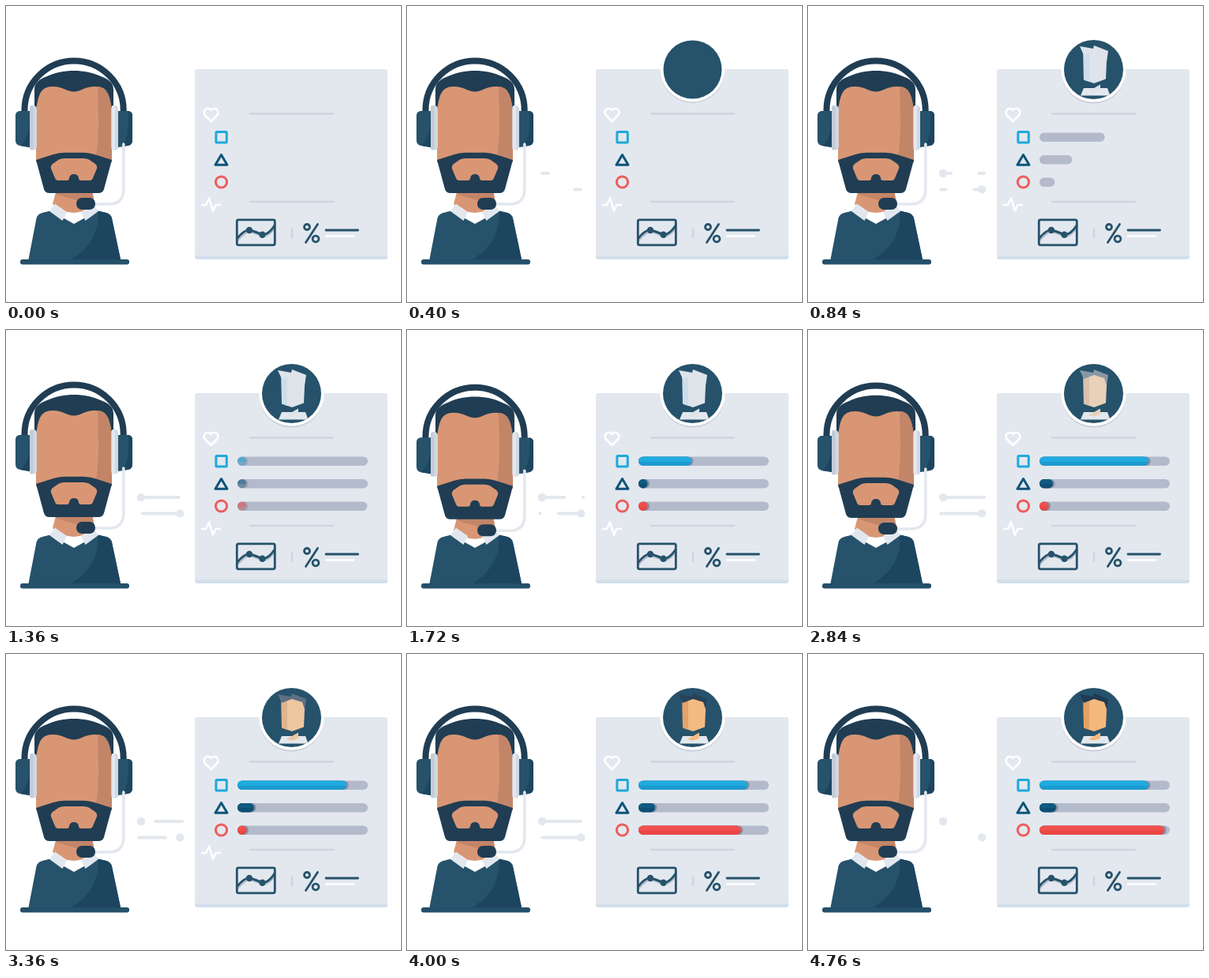
Animation, 500 px wide and 375 px high, one loop 4800 ms. Source, as an HTML page:

```html
<!DOCTYPE html>
<html lang="en">
<head>
<meta charset="utf-8">
<title>Support agent and customer profile</title>
<style>
  html, body { margin: 0; width: 100%; height: 100%; overflow: hidden; background: #fff; }
  svg { display: block; width: 100%; height: 100%; }
  .line { fill: none; stroke-linecap: round; stroke-linejoin: round; }
</style>
</head>
<body>
<svg viewBox="0 0 500 375">
  <defs>
    <clipPath id="disc"><circle cx="361.5" cy="80.5" r="37.5"/></clipPath>
    <clipPath id="cup"><path d="M142 133H155Q160 134 160 139V170Q160 176 154 177L142 179Z"/></clipPath>
  </defs>

  <!-- agent -->
  <path d="M60 252H112L101 268L86 275L71 268Z" fill="#fff"/>
  <g id="head">
    <path d="M64 232L59 251Q72 262 86 262Q102 261 112 251L109 232Z" fill="#d99674"/>
    <path d="M64 234H109L112 250Q84 246 63 238Z" fill="#c38568"/>
    <path d="M36 132V106C36 97 42 93 52 89C72 79.500 100 79.500 120 89C130 93 136 97 136 106V132L134 150H38Z" fill="#203d53"/>
    <path d="M38 198V140C38 128 40 118 43 111Q47 102 59 102C72 102 77 108.500 86 108.500S99 102 113 102Q125 102 129 111C132 118 134 128 134 140V198Z" fill="#d99674"/>
    <path d="M116 102.200Q125 102 129 111C132 118 134 128 134 140V198L114 190Q117 170 117 145Z" fill="#c38568"/>
    <path d="M38 195L60 188Q66 186 74 185.800H98Q106 186 112 188L134 195L124 232Q122.500 237 117 237H55Q49.500 237 48 232Z" fill="#203d53"/>
    <path d="M74 193H98Q102 193 105 194.500L113 200Q116 203 115 206L110 218Q109 221 106 221H95Q92 221 92 218Q91 213 86 213T80 218Q80 221 77 221H66Q63 221 62 218L57 206Q56 203 59 200L67 194.500Q70 193 74 193Z" fill="#d99674"/>
  </g>
  <path d="M28.500 321L38.500 269Q40 263.500 46 262L56 259.500L86 276L116 259.500L127 262Q132.500 263.500 134 269L145 321Z" fill="#26526b"/>
  <path d="M116.500 259.500C118 285 108 306 83 321H145L134 269Q132.500 263.500 127 262Z" fill="#1d4560"/>
  <path d="M71 262L86 275L101 262L86 266Z" fill="#fff"/>
  <path d="M62 250.500L55 260L71.500 272L77 261ZM110 250.500L117 260L100.500 272L95 261Z" fill="#e2e7ef"/>
  <rect x="18" y="321" width="138" height="6.500" rx="3" fill="#25506a"/>
  <g id="headset">
    <path class="line" d="M23.500 135V132A62.600 62.600 0 0 1 148.700 132V135" stroke="#203d53" stroke-width="8"/>
    <path d="M30 133H17Q12 134 12 139V170Q12 176 18 177L30 179Z" fill="#26526b"/>
    <path d="M30 133V179L18 177Q26 172 29 155Z" fill="#1d4560"/>
    <g clip-path="url(#cup)">
      <path d="M142 130H161V182H142Z" fill="#26526b"/>
      <path d="M155 130H161V182H142Q155 172 155 150Z" fill="#1d4560"/>
    </g>
    <rect x="30" y="126" width="9" height="56.500" rx="4.500" fill="#d0d8e2"/>
    <rect x="30" y="126" width="4.500" height="56.500" rx="2.200" fill="#c2ccd8"/>
    <rect x="133.500" y="126" width="8.500" height="56.500" rx="4.200" fill="#d0d8e2"/>
    <rect x="133.500" y="126" width="4.500" height="56.500" rx="2.200" fill="#e2e7ef"/>
    <path class="line" d="M148.800 175V232Q148.800 251 130 251H112" stroke="#e3e7ee" stroke-width="3.500"/>
    <rect x="89" y="243" width="24" height="15" rx="7.200" fill="#203d53"/>
  </g>

  <!-- connection -->
  <g class="line" stroke="#e3e7ee" stroke-width="4">
    <g id="link">
      <path id="grown"/><path id="leaving"/>
      <circle id="dot" cx="171" cy="212" fill="#e3e7ee" stroke="none"/>
    </g>
    <use href="#link" transform="rotate(180 195.600 222.200)"/>
  </g>

  <!-- card -->
  <rect x="239" y="80" width="244" height="241" rx="3.500" fill="#d2dfeb"/>
  <path d="M239 316.500V83.500Q239 80 242.500 80H479.500Q483 80 483 83.500V316.500Z" fill="#e3e8ef"/>
  <g class="line" stroke-width="3">
    <path d="M309 136.500H414M309 248H414M362 283V293" stroke="#cfd4e0" stroke-width="2.600"/>
    <path d="M259.500 146L251.500 138A5 5 0 0 1 259.500 132A5 5 0 0 1 267.500 138Z" stroke="#fff" stroke-width="2.600"/>
    <path id="pulse" d="M248 252H253L257 243.500L262 259.500L265.500 252H271" stroke="#fff" stroke-width="2.600"/>
    <rect x="265.900" y="159.600" width="13.400" height="13.400" rx="1" stroke="#1fa9db"/>
    <path d="M272.500 188.600L280 201.300H265Z" stroke="#0f5479"/>
    <circle cx="272.500" cy="223" r="7.100" stroke="#ee5d5a"/>
    <g stroke="#26526b" stroke-width="2.800">
      <path d="M293 297Q303 285 309 286T326 292Q334 290 340 281" stroke="#b3bacb"/>
      <rect x="292.300" y="270.800" width="48" height="32" rx="2"/>
      <path d="M293 294Q302 283 308 284T325 290Q333 289 340 278"/>
      <g fill="#26526b" stroke="none"><circle cx="308" cy="284" r="4.200"/><circle cx="324.500" cy="289.800" r="4.200"/></g>
      <circle cx="381" cy="280" r="3.500"/><circle cx="392" cy="295" r="3.900"/>
      <path d="M394.500 276.500L379.500 299.500M405 284H445.500"/>
    </g>
    <path d="M405 291.500H440" stroke="#fff" stroke-width="2.500"/>
  </g>
  <g id="bars"></g>

  <!-- portrait -->
  <g id="portrait">
    <circle cx="361.500" cy="82.500" r="41" fill="#c8ced8"/>
    <circle cx="361.500" cy="80.500" r="41.300" fill="#fff"/>
    <circle cx="361.500" cy="80.500" r="37.500" fill="#26526b"/>
    <g id="person" clip-path="url(#disc)">
      <path d="M345 113.500L349 104H379L382.500 113.500Z" fill="#e3e7ee"/>
      <path class="skin" d="M355 108L370 99.500V107L362 109.500Z"/>
      <path class="skin" d="M348.500 58L363 54L378.500 60L377 92.500L362 98L349 93.500Z"/>
      <path class="shade" d="M348.500 58L356 56V96L349 93.500Z"/>
      <path class="hair" d="M344 51L361 54L362 50L380 57L378 70L375 61L362 57L349 62Z"/>
    </g>
  </g>
</svg>
<script>
const LOOP = 4800;
const $ = id => document.getElementById(id);
const ramp = (t, start, length) => Math.min(1, Math.max(0, (t - start) / length));
const ease = (t, start, length) => (1 - Math.cos(Math.PI * ramp(t, start, length))) / 2;
const mix = (a, b, k) => `rgb(${a.map((v, i) => v + (b[i] - v) * k)})`;

const BAR_H = 11.5;
const bars = [
  { y: 160.5, width: 138, color: '#1fabdf', dark: '#1c9bd0', grow: 536 },
  { y: 189, width: 21, color: '#0f5a80', dark: '#0d4f74', grow: 655 },
  { y: 217.5, width: 158, color: '#f0514f', dark: '#ea4644', grow: 748 },
];

function addRect(fill, y) {
  const rect = document.createElementNS('http://www.w3.org/2000/svg', 'rect');
  for (const [name, value] of Object.entries({ x: 293, y, height: BAR_H, rx: BAR_H / 2, fill }))
    rect.setAttribute(name, value);
  return $('bars').appendChild(rect);
}
for (const bar of bars) {
  bar.track = addRect('#b3bacb', bar.y);
  bar.shadow = addRect('rgba(50,60,90,.35)', bar.y);
  bar.base = addRect(bar.dark, bar.y);
  bar.fill = addRect(bar.color, bar.y);
  bar.fill.style.clipPath = 'inset(0 0 45% 0)';
}

function setWidth(rect, width, opacity) {
  rect.setAttribute('width', width);
  rect.setAttribute('opacity', opacity);
}

function drawBars(t) {
  bars.forEach((bar, i) => {
    setWidth(bar.track, BAR_H + (165 - BAR_H) * ease(t, bar.grow, 640), ramp(t, bar.grow - 40, 40));
    const width = BAR_H + (bar.width - BAR_H) * ease(t, 1463 + i * 1070, 560);
    const shown = ramp(t, 1320, 120);
    setWidth(bar.shadow, width + 2.5, shown);
    setWidth(bar.base, width, shown);
    setWidth(bar.fill, width, shown);
  });
}

// Each beat sends a gap along the line: the old dash leaves, a new one follows.
const beats = [255, 687, 1103, 1519, 1985, 2450, 2865, 3280, 3736, 4190];
const dash = (a, b) => `M${171 + 52 * a} 212H${171 + 52 * b}`;
function drawLink(t) {
  const start = beats.findLast(beat => beat <= t) ?? LOOP;
  const front = ease(t, start + 96, 200) * (1 - ramp(t, 4470, 260));
  const leaving = start > beats[0] && t >= start && t < start + 205;
  $('grown').setAttribute('d', front > 0 ? dash(0, front) : '');
  $('leaving').setAttribute('d', leaving ? dash(ease(t, start, 200), 1) : '');
  $('dot').setAttribute('r', 5.2 * ease(t, 570, 160));
}

const paint = {
  skin: [[223, 227, 234], [245, 184, 124]],
  shade: [[207, 221, 235], [229, 160, 100]],
  hair: [[223, 227, 234], [31, 58, 82]],
};
function drawPortrait(t) {
  const size = 1 - (1 - ramp(t, 20, 500)) ** 3;
  $('portrait').setAttribute('transform', `translate(361.5 80.5) scale(${size}) translate(-361.5 -80.5)`);
  $('person').setAttribute('opacity', ramp(t, 570, 250));
  const k = ramp(t, 1800, 2300);
  for (const part in paint)
    document.querySelectorAll('.' + part).forEach(el => el.setAttribute('fill', mix(...paint[part], k)));
}

function drawAgent(t) {
  const nod = t > 1440 && t < 4000 ? (1 - Math.cos((t - 1440) / 640 * 2 * Math.PI)) / 2 : 0;
  $('head').setAttribute('transform', `translate(0 ${2.8 * nod})`);
  $('headset').setAttribute('transform', `translate(0 ${3.4 * nod})`);
}

const began = performance.now();
function draw() {
  const t = (performance.now() - began) % LOOP;
  drawAgent(t);
  drawLink(t);
  drawBars(t);
  drawPortrait(t);
  $('pulse').setAttribute('opacity', 1 - ramp(t, 3600, 300));
  requestAnimationFrame(draw);
}
draw();
</script>
</body>
</html>
```
